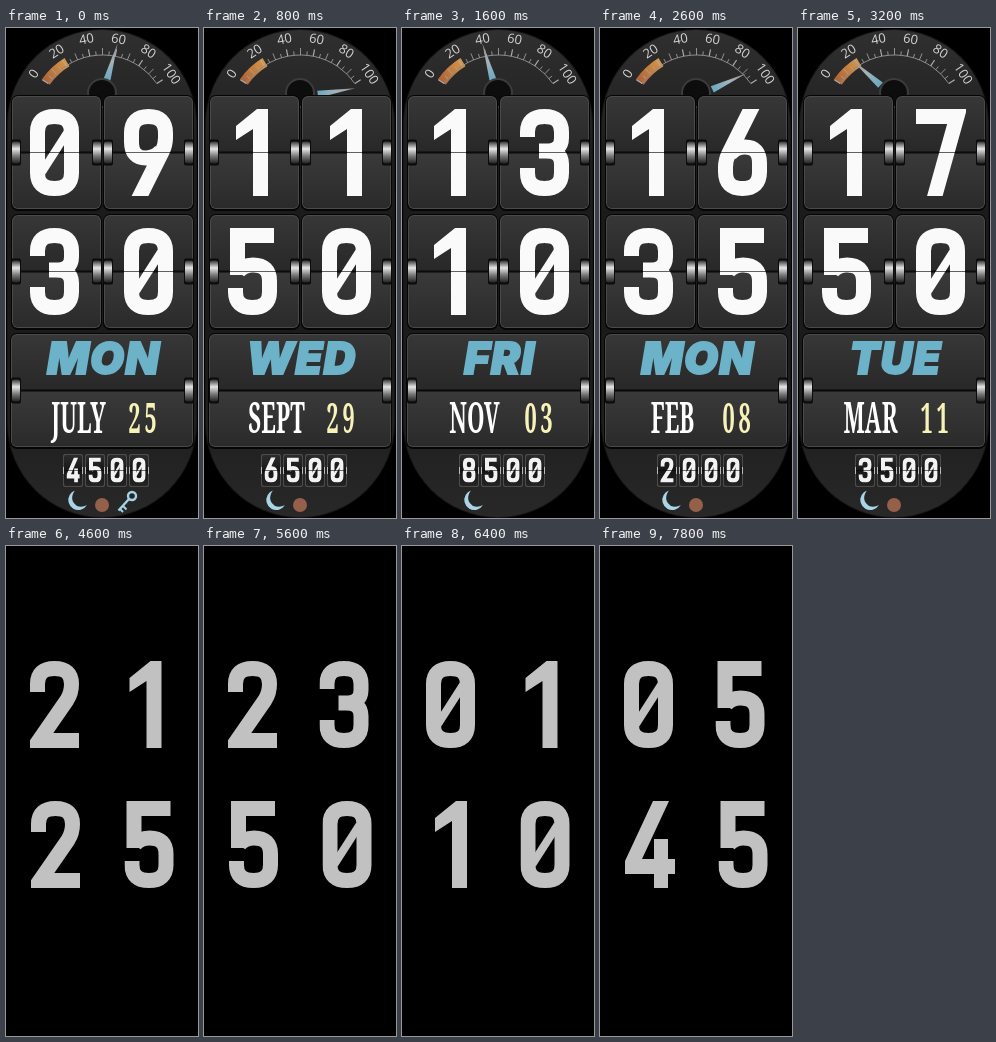
Animation, 192 px wide and 490 px high, one loop 8000 ms. Source, as an HTML page with a canvas:

```html
<!DOCTYPE html>
<html lang="en">
<head>
<meta charset="utf-8">
<title>Flip clock</title>
<style>
html, body { margin: 0; width: 100%; height: 100%; overflow: hidden; background: #000; }
canvas { display: block; width: 192px; height: 490px; }
</style>
</head>
<body>
<canvas id="c" width="192" height="490"></canvas>
<script>
const ctx = document.getElementById('c').getContext('2d');
const STEP = 200, STEPS = 40, AWAKE = 20;
const DAYS = ['MON', 'TUE', 'WED', 'THU', 'FRI', 'SAT', 'SUN'];
const MONTHS = ['JAN', 'FEB', 'MAR', 'APR', 'MAY', 'JUNE', 'JULY', 'AUG', 'SEPT', 'OCT', 'NOV', 'DEC'];
const pad = (n, len = 2) => String(n).padStart(len, '0');
const rad = deg => deg * Math.PI / 180;

function vGrad(y0, y1, ...colors) {
  const g = ctx.createLinearGradient(0, y0, 0, y1);
  colors.forEach((c, i) => g.addColorStop(i / (colors.length - 1), c));
  return g;
}

function box(x, y, w, h, r, fill) {
  ctx.beginPath();
  ctx.roundRect(x, y, w, h, r);
  ctx.fillStyle = fill;
  ctx.fill();
}

function line(x0, y0, x1, y1, color, width = 1) {
  ctx.beginPath();
  ctx.moveTo(x0, y0);
  ctx.lineTo(x1, y1);
  ctx.strokeStyle = color;
  ctx.lineWidth = width;
  ctx.stroke();
}

function disc(x, y, r, fill) {
  ctx.beginPath();
  ctx.arc(x, y, r, 0, 7);
  ctx.fillStyle = fill;
  ctx.fill();
}

// Digits live in a 49 x 87 cell.
const W = 49, H = 87;
const glyphs = {
  0: 'M7.5 23Q7.5 7.5 24.5 7.5T41.5 23V64Q41.5 79.5 24.5 79.5T7.5 64ZM12 63L37 24',
  2: 'M7.5 31V23Q7.5 7.5 24.5 7.5T41.5 23Q41.5 32 37 39L9 79.5H49',
  3: 'M7.5 28V23Q7.5 7.5 24.5 7.5T41.5 23V29Q41.5 42 26 42H19M26 42Q41.5 42 41.5 55V64Q41.5 79.5 24.5 79.5T7.5 64V59',
  5: 'M46 7.5H9.5V47M10 44Q15 37 25 37Q41.5 37 41.5 53V64Q41.5 79.5 24.5 79.5T7.5 64V60',
  6: 'M35 -4L11 44Q7.5 51 7.5 58V63Q7.5 79.5 24.5 79.5T41.5 63V54Q41.5 38 27 38Q18 38 12 45',
  7: 'M0 7.5H41L18 90',
  8: 'M9 22Q9 7.5 24.5 7.5T40 22V28Q40 41 24.5 41T9 28ZM7.5 57Q7.5 41 24.5 41T41.5 57V64Q41.5 79.5 24.5 79.5T7.5 64Z'
};
const solids = {
  1: 'M40 0H29L8 17V31L25 20V87H40Z',
  4: 'M28 0H44L17 58H29V38H43V58H50V73H43V87H29V73H0V60Z'
};

function digit(d, x, y, color, scaleX = 1, scaleY = scaleX) {
  ctx.save();
  ctx.translate(x, y);
  ctx.scale(scaleX, scaleY);
  if (d === '9') {
    ctx.translate(W, H);
    ctx.rotate(Math.PI);
    d = '6';
  }
  ctx.beginPath();
  ctx.rect(0, 0, W + 1, H);
  ctx.clip();
  if (solids[d]) {
    ctx.fillStyle = color;
    ctx.fill(new Path2D(solids[d]));
  } else {
    ctx.strokeStyle = color;
    ctx.lineWidth = 15;
    if (d === '0') {
      const [ring, slash] = glyphs[0].split('Z');
      ctx.stroke(new Path2D(ring + 'Z'));
      ctx.lineWidth = 8;
      ctx.stroke(new Path2D(slash));
    } else {
      ctx.stroke(new Path2D(glyphs[d]));
    }
  }
  ctx.restore();
}

function card(x, y, w, h) {
  const mid = y + h / 2;
  box(x - 1, y - 1, w + 2, h + 3, 7, '#050505');
  box(x, y, w, h, 6, '#4a4a4a');
  box(x + 1, y + 1, w - 2, h - 2, 5, vGrad(y, mid, '#373737', '#282828'));
  box(x + 1, mid, w - 2, h / 2 - 1, [0, 0, 5, 5], vGrad(mid, y + h, '#3a3a3a', '#2a2a2a'));
  line(x, mid, x + w, mid, '#080808', 2);
}

function hinge(x, y) {
  box(x - 1, y - 13, 10, 26, 2, '#0b0b0b');
  box(x, y - 11, 8, 22, 2, vGrad(y - 11, y + 11, '#333', '#e6e6e6', '#777', '#222'));
}

function gauge(level) {
  const cx = 96.5, cy = 93, perUnit = 1.11;
  const angle = v => rad((v - 50) * perUnit);
  const polar = (r, a) => [cx + r * Math.sin(a), cy - r * Math.cos(a)];
  const arc = (r, from, to, back) =>
    ctx.arc(cx, cy, r, angle(from) - Math.PI / 2, angle(to) - Math.PI / 2, back);

  const g = ctx.createLinearGradient(36, 52, 60, 34);
  g.addColorStop(0, '#ab6036');
  g.addColorStop(1, '#d79444');
  ctx.beginPath();
  arc(73.5, 0, 22);
  arc(64, 22, 0, true);
  ctx.fillStyle = g;
  ctx.fill();

  ctx.beginPath();
  arc(66, 0, 100);
  ctx.strokeStyle = '#8c8c8c';
  ctx.lineWidth = 1;
  ctx.stroke();
  for (let v = 0; v <= 100; v += 5) {
    const a = angle(v);
    line(...polar(66, a), ...polar(v % 10 ? 70 : 73, a), '#aaa', v % 20 ? 0.8 : 1.2);
  }
  ctx.font = '13px "Open Sans", sans-serif';
  ctx.fillStyle = '#d4d4d4';
  ctx.textAlign = 'center';
  ctx.textBaseline = 'middle';
  for (let v = 0; v <= 100; v += 20) {
    ctx.save();
    ctx.translate(...polar(82.5, angle(v)));
    ctx.rotate(angle(v));
    ctx.fillText(v, 0, 0);
    ctx.restore();
  }

  ctx.save();
  ctx.translate(96, 69);
  ctx.rotate(rad((level - 50) * 1.62));
  ctx.beginPath();
  ctx.moveTo(0, -56);
  ctx.lineTo(3.5, -18);
  ctx.lineTo(-3.5, -18);
  ctx.fillStyle = vGrad(-56, -18, '#8f8f8f', '#a5b3ba', '#69aac2');
  ctx.fill();
  ctx.restore();
  disc(96, 65, 15, '#3c3c3c');
  disc(96, 65, 13, '#0d0d0d');
}

function counter(text) {
  [...text].forEach((d, i) => {
    const x = 57 + i * 22;
    box(x, 426, 20, 33, 2, '#4c4c4c');
    box(x + 1, 427, 18, 31, 2, vGrad(427, 458, '#2c2c2c', '#161616', '#242424'));
    digit(d, x + 3.5, 429.5, '#f2f2f2', 13 / W, 25 / H);
    line(x, 442.5, x + 20, 442.5, 'rgba(0,0,0,.55)');
    line(x + 0.5, 439, x + 0.5, 446, '#bbb');
    line(x + 19.5, 439, x + 19.5, 446, '#bbb');
  });
}

function moon() {
  ctx.beginPath();
  ctx.arc(72.3, 472, 10, rad(30), rad(250));
  ctx.quadraticCurveTo(62.5, 472, 71, 478);
  ctx.quadraticCurveTo(76, 480, 81, 477);
  ctx.fillStyle = '#a9d5e6';
  ctx.fill();
}

function key() {
  const c = '#a3d3e4';
  ctx.beginPath();
  ctx.arc(126, 468, 4, 0, 7);
  ctx.strokeStyle = c;
  ctx.lineWidth = 2.4;
  ctx.stroke();
  line(123, 471, 112.5, 482.5, c, 2.4);
  line(117, 478, 120.5, 481.5, c, 2);
  line(114, 481, 117, 484, c, 2);
}

function dateCard(s) {
  card(5, 306, 182, 113);
  ctx.textBaseline = 'alphabetic';
  ctx.textAlign = 'center';
  ctx.font = 'italic 900 44px Inter, "Open Sans", sans-serif';
  ctx.letterSpacing = '1px';
  ctx.fillStyle = ctx.strokeStyle = '#6cb2c9';
  ctx.lineWidth = 1.8;
  ctx.lineJoin = 'miter';
  ctx.fillText(s.weekday, 97.5, 346);
  ctx.strokeText(s.weekday, 97.5, 346);
  ctx.letterSpacing = '0px';

  // One fixed condensed cut for the date line.
  const cut = 0.52;
  ctx.save();
  ctx.scale(cut, 1);
  ctx.font = 'bold 43px "Noto Serif", serif';
  ctx.fillStyle = '#fff';
  ctx.fillText(s.month, 72.5 / cut, 405);
  ctx.fillStyle = '#f7f3b8';
  ctx.font = '600 42px "Noto Serif", serif';
  [...s.day].forEach((d, i) => ctx.fillText(d, (128.5 + 16 * i) / cut, 405));
  ctx.restore();
}

function drawAwake(s) {
  box(1, 1, 190, 489, 95, '#151515');
  box(2, 2, 188, 487, 94, vGrad(2, 489, '#303030', '#1d1d1d', '#191919', '#1d1d1d', '#282828'));
  gauge(s.level);
  [[68, 81, s.hour], [187, 200, s.minute]].forEach(([top, y, text]) => {
    const mid = top + 56.5;
    [[6, 24], [98, 118]].forEach(([x, dx], i) => {
      card(x, top, 89, 113);
      digit(text[i], dx, y, '#fafafa');
      line(x, mid, x + 89, mid, 'rgba(15,15,15,.65)');
    });
    [6, 87, 98, 179].forEach(x => hinge(x, mid));
  });
  dateCard(s);
  hinge(6, 362.5);
  hinge(179, 362.5);
  counter(s.walked);
  moon();
  if (s.linked) disc(96, 477, 7, '#956049');
  if (s.locked) key();
}

function drawDim(s) {
  const c = '#c1c1c1';
  digit(s.hour[0], 24, 115, c);
  digit(s.hour[1], 115.5, 115, c);
  digit(s.minute[0], 25, 255, c);
  digit(s.minute[1], 118.5, 255, c);
}

function stateAt(n) {
  const half = Math.ceil(n / 2);
  return {
    hour: pad((9 + half) % 24),
    minute: pad((30 + n * 5) % 60),
    weekday: DAYS[half % 7],
    month: MONTHS[(6 + half) % 12],
    day: pad((24 + n) % 30 + 1),
    walked: pad(1000 + (3500 + n * 500) % 9000, 4),
    level: (50 + n * 10) % 100 + 10,
    linked: n !== 8,
    locked: n === 0
  };
}

function tick(now) {
  const n = Math.floor(now / STEP) % STEPS;
  ctx.fillStyle = '#000';
  ctx.fillRect(0, 0, 192, 490);
  (n < AWAKE ? drawAwake : drawDim)(stateAt(n));
  requestAnimationFrame(tick);
}
tick(0);
</script>
</body>
</html>
```
